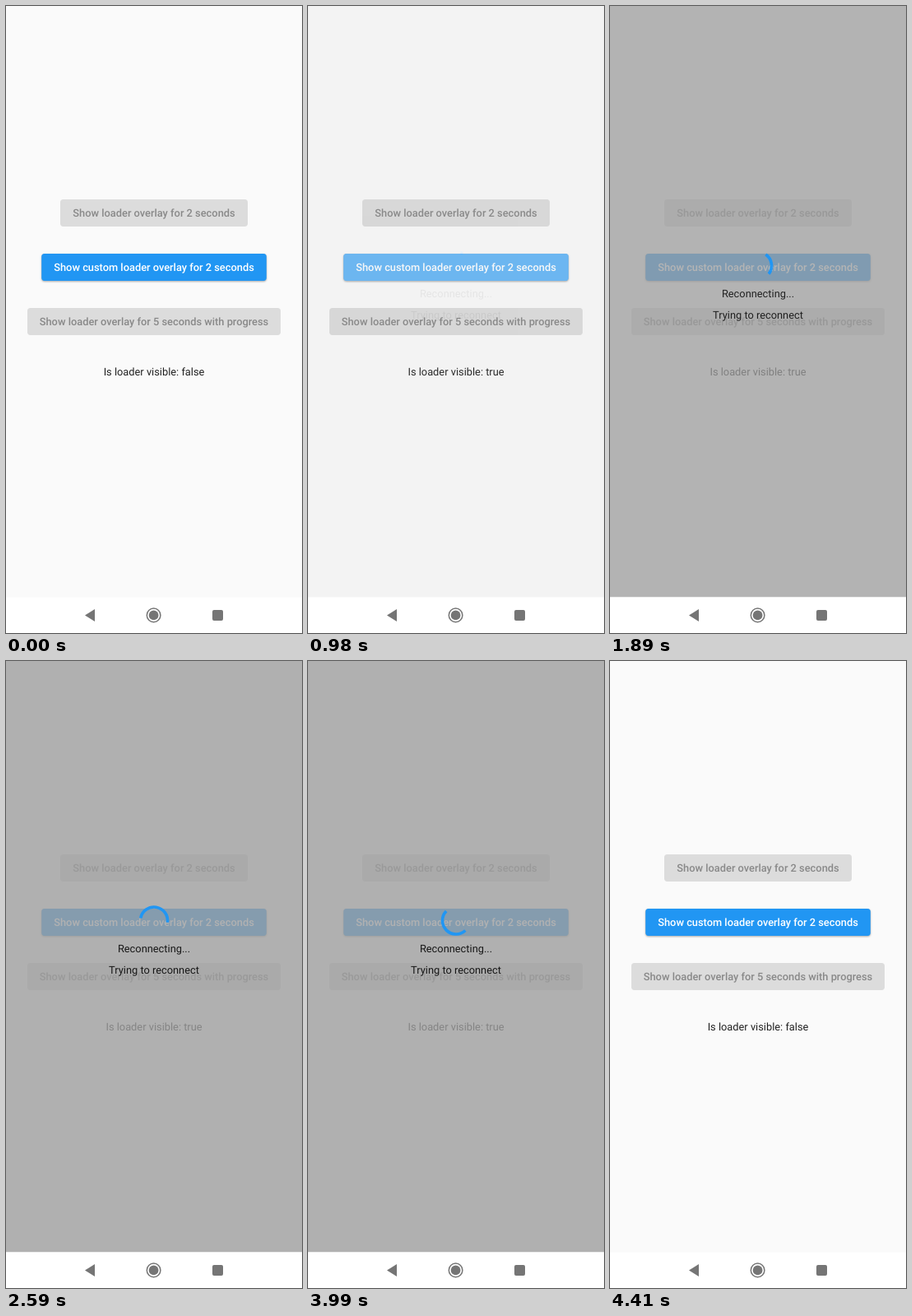
Animation of 360x762 px, one loop 4480 ms. Source, as an HTML page:

```html
<!DOCTYPE html>
<html lang="en">
<head>
<meta charset="utf-8">
<title>Loader overlay</title>
<style>
  html, body { margin: 0; width: 100%; height: 100%; overflow: hidden; background: #fafafa; }
  svg { display: block; width: 100%; height: 100%; }
  text { font: 400 12.83px Roboto, sans-serif; text-anchor: middle; fill: #000; fill-opacity: .87;
         text-rendering: geometricPrecision; }
  .label { font-weight: 500; }
  .disabled rect { fill: #dcdcdc; }
  .disabled text { fill-opacity: .38; }
  .on-primary { fill: #fff; fill-opacity: 1; }
</style>
</head>
<body>
<svg viewBox="0 0 360 762">
  <defs>
    <clipPath id="buttonClip"><rect x="43.2" y="301" width="273.6" height="33" rx="3.67"/></clipPath>
  </defs>
  <rect width="360" height="762" fill="#fafafa"/>

  <g class="disabled">
    <rect x="66" y="235" width="228" height="33" rx="3.67"/>
    <text class="label" x="180" y="256">Show loader overlay for 2 seconds</text>
    <rect x="26" y="367" width="308" height="33" rx="3.67"/>
    <text class="label" x="180" y="388">Show loader overlay for 5 seconds with progress</text>
  </g>

  <rect id="button" x="43.2" y="301" width="273.6" height="33" rx="3.67" fill="#2196f3"/>
  <g clip-path="url(#buttonClip)" fill="#fff">
    <rect id="highlight" x="43" y="301" width="274" height="33"/>
    <circle id="ripple" cy="317.5"/>
  </g>
  <text class="label on-primary" x="180" y="322">Show custom loader overlay for 2 seconds</text>
  <text id="status" x="180" y="448.5"></text>

  <g id="overlay">
    <rect width="360" height="718.5" fill="#9e9e9e" fill-opacity=".8"/>
    <path id="spinner" fill="none" stroke="#2196f3" stroke-width="3.67"/>
    <text x="180" y="354">Reconnecting...</text>
    <text x="180" y="380">Trying to reconnect</text>
  </g>

  <rect y="718.5" width="360" height="44" fill="#fff"/>
  <g fill="#757575">
    <path d="M96 740.5L108 733V748Z"/>
    <circle cx="179.6" cy="740.4" r="8.3" fill="none" stroke="#757575" stroke-width="1.5"/>
    <circle cx="179.6" cy="740.4" r="5.9"/>
    <rect x="251" y="734" width="13" height="13" rx="2"/>
  </g>
</svg>
<script>
const LOOP = 4480, STEP = 70, RATE = 1.05;   // RATE: playback ms per app ms
const PRESS = 306, RELEASE = 860, SHOW = 885, SPIN = 895, HIDE = 4060;
const [button, highlight, ripple, status, overlay, spinner] =
  ['button', 'highlight', 'ripple', 'status', 'overlay', 'spinner'].map(id => document.getElementById(id));

const clamp = v => Math.min(1, Math.max(0, v));
const progress = (t, start, duration) => clamp((t - start) / (duration * RATE));

function bezier(x1, y1, x2, y2) {
  const at = (a, b, s) => 3 * a * s * (1 - s) ** 2 + 3 * b * s * s * (1 - s) + s ** 3;
  return x => {
    let lo = 0, hi = 1;
    for (let i = 0; i < 24; i++) {
      const mid = (lo + hi) / 2;
      if (at(x1, x2, mid) < x) lo = mid; else hi = mid;
    }
    return at(y1, y2, lo);
  };
}
const ease = bezier(.25, .1, .25, 1);
const standard = bezier(.4, 0, .2, 1);

function drawButton(t) {
  const press = progress(t, PRESS, 200), release = progress(t, RELEASE, 200);
  highlight.style.opacity = .24 * (press - release);

  const lift = 2 + 6 * (standard(press) - standard(release));
  button.style.filter = `drop-shadow(0 ${lift * .5}px ${lift * .45}px rgba(0,0,0,.3)) ` +
    `drop-shadow(0 0 ${lift * .2}px rgba(0,0,0,.1))`;

  // Slow growth while held, quick growth after release
  const held = progress(Math.min(t, RELEASE), PRESS, 1000);
  const grow = ease(clamp(held + progress(t, RELEASE, 225)));
  ripple.setAttribute('cx', 93 + 87 * grow);
  ripple.setAttribute('r', 43 + 100 * grow);
  ripple.style.opacity = .24 * (progress(t, PRESS, 75) - progress(t, RELEASE + 225 * RATE, 150));
}

function drawSpinner(t) {
  const time = Math.max(0, t - SPIN) / RATE;
  const cycle = time / 1333 % 1;
  const head = 1.5 * Math.PI * standard(clamp(cycle * 2));
  const tail = 1.5 * Math.PI * standard(clamp(cycle * 2 - 1));
  const turn = Math.PI * (-.5 + 2 * time / 2222 + .5 * cycle);
  const point = a => `${180 + 16.5 * Math.cos(a)} ${315.5 + 16.5 * Math.sin(a)}`;
  const sweep = Math.max(head - tail, .001);
  const start = turn + tail;
  spinner.setAttribute('d',
    `M${point(start)}A16.5 16.5 0 ${sweep > Math.PI ? 1 : 0} 1 ${point(start + sweep)}`);
}

function draw(t) {
  const visible = t >= SHOW && t < HIDE;
  drawButton(t);
  status.textContent = `Is loader visible: ${visible}`;
  overlay.style.opacity = visible ? progress(t, SHOW, 1000) : 0;
  if (visible) drawSpinner(t);
}

const origin = performance.now();
function tick() {
  const t = (performance.now() - origin) % LOOP;
  draw(Math.floor(t / STEP) * STEP);
  requestAnimationFrame(tick);
}
tick();
</script>
</body>
</html>
```
